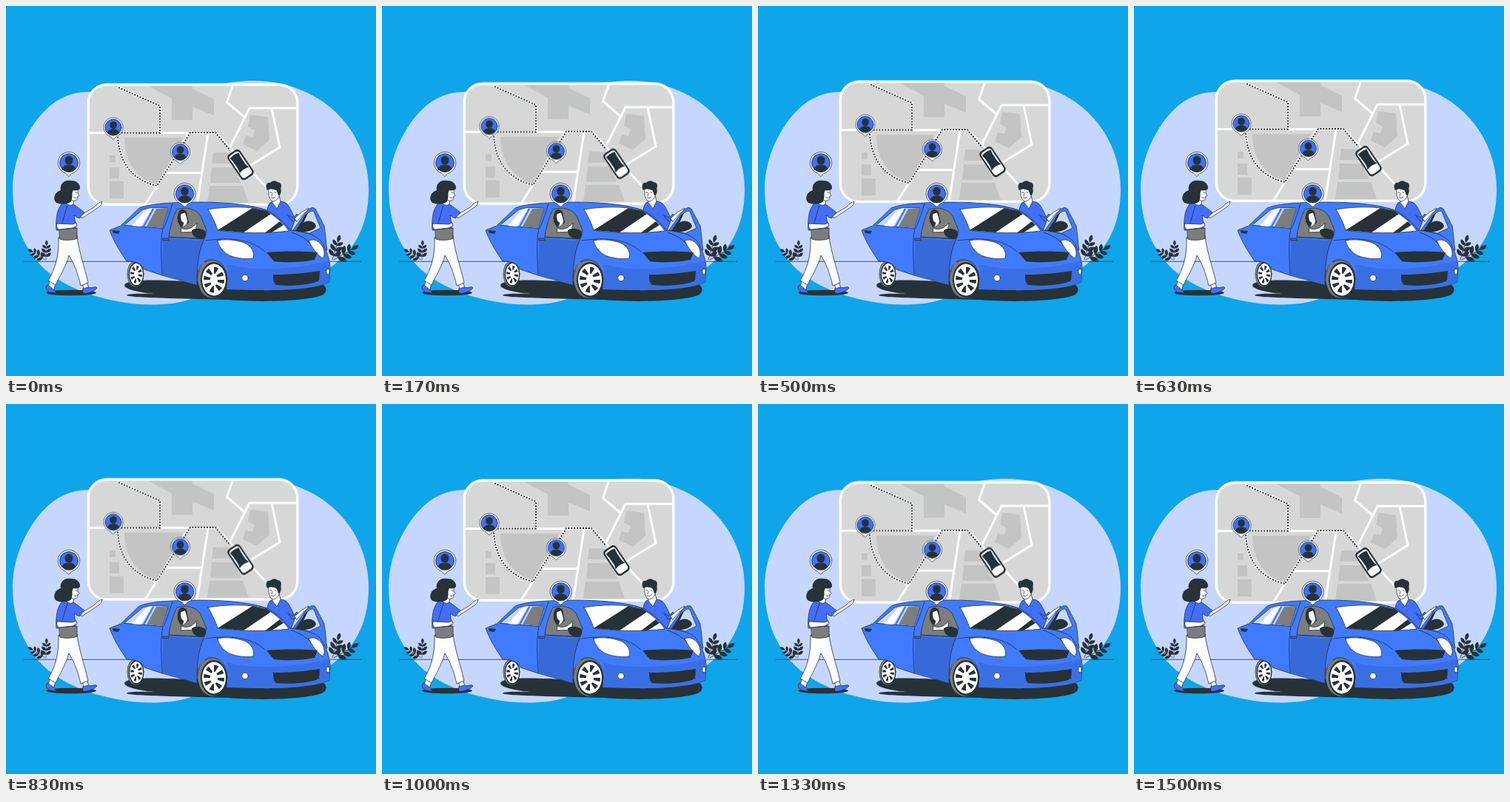
An HTML page for the animation above (1.54 s loop, 500 by 500 pixels).

```html
<!DOCTYPE html>
<html lang="en">
<head>
<meta charset="utf-8">
<title>Ride sharing</title>
<style>
  html, body { margin: 0; width: 100%; height: 100%; overflow: hidden; background: #0fa5ea; }
  svg { display: block; width: 100%; height: 100%; }
  .ink { fill: #263238; }
  .blue { fill: #416ff8; }
  .paint { fill: #407bff; }
  .shade { fill: #3869d8; }
  .white { fill: #fff; }
  .pale { fill: #c6d7ff; }
  .grey { fill: #7b7d7f; }
  .block { fill: #c3c4c4; }
  .edge { stroke: #263238; stroke-width: .8; stroke-linejoin: round; stroke-linecap: round; }
  .line { fill: none; }
  .road { fill: none; stroke: #fff; stroke-width: 3; }
  .dots { fill: none; stroke: #1b2226; stroke-width: 1.8; stroke-dasharray: 2 1.9; }
  #map { animation: float 1540ms linear infinite; }
  @keyframes float {
    0% { transform: translateY(0); }
    44.8% { transform: translateY(-5.5px); }
    93.5% { transform: translateY(.5px); }
    97.4%, 100% { transform: translateY(0); }
  }
</style>
</head>
<body>
<svg viewBox="0 0 500 500">
  <defs>
    <clipPath id="disc"><circle r="12.3"/></clipPath>
    <clipPath id="panel"><rect x="112" y="106.500" width="281" height="161.500" rx="24"/></clipPath>
    <g id="pin">
      <path class="white edge" d="M-5 14.100A15 15 0 1 1 5 14.100L0 18.500Z"/>
      <circle class="blue edge" r="12.800"/>
      <g clip-path="url(#disc)" class="ink">
        <ellipse cy="-3.600" rx="5.600" ry="6"/>
        <path d="M-10 13C-10 5 -6 2.500 0 2.500S10 5 10 13Z"/>
      </g>
    </g>
    <path id="leaf" class="ink" d="M0 0C0 -5 4 -8 9 -8C10 -4 6 1 0 0Z"/>
    <g id="pair">
      <use href="#leaf"/>
      <use href="#leaf" transform="scale(-1 1)"/>
    </g>
    <g id="sprig">
      <path class="line edge" d="M0 0V-30"/>
      <use href="#pair" y="-6"/>
      <use href="#pair" y="-14"/>
      <use href="#pair" transform="translate(0 -22) scale(.85)"/>
      <path class="ink" d="M0 -27C-4 -31 -3 -36 0 -38C3 -36 4 -31 0 -27Z"/>
    </g>
    <g id="wheel">
      <ellipse class="grey edge" rx="20" ry="26"/>
      <ellipse class="ink" cx="2" cy="1" rx="18" ry="24"/>
      <ellipse class="white" cx="2" cy="1" rx="16" ry="21.500"/>
      <ellipse cx="2" cy="1" rx="9.500" ry="13" fill="none" stroke="#263238" stroke-width="9" pathLength="64" stroke-dasharray="3.800 4.200"/>
      <ellipse class="white" cx="2" cy="1" rx="5" ry="6.500"/>
    </g>
  </defs>

  <path class="pale" d="M9 247C9 200 36 151 66 130C85 117 105 114 130 117C180 128 240 118 280 108C300 103 317 101 335 101C383 101 425 121 450 148C477 176 490 212 490 247C490 305 465 340 420 365C370 390 290 388 250 396C225 405 185 406 150 399C92 388 52 364 32 331C16 307 9 277 9 247Z"/>
  <path class="line edge" d="M24 345.300H480"/>
  <g>
    <use href="#sprig" transform="translate(54 343) rotate(2) scale(.7)"/>
    <use href="#sprig" transform="translate(53 343) rotate(-58) scale(.72)"/>
    <use href="#sprig" transform="translate(441 343) rotate(17) scale(.92)"/>
    <use href="#sprig" transform="translate(443 343) rotate(60) scale(1.020)"/>
  </g>

  <g id="map">
    <rect x="111.200" y="106.200" width="282.600" height="162.200" rx="25" fill="#d6d8d7"/>
    <g clip-path="url(#panel)">
      <g class="block">
        <path d="M190 107H252V112L281 126V148L252 136V154H224V125Z"/>
        <path d="M160 178H239L205 241C179 236 160 212 160 178Z"/>
        <path d="M140 202h8v9h-8zM140 218h13v15h-13zM140 237h19v23h-19z"/>
        <path d="M280 198H300L306 213H278ZM278 218H308L318 239H276ZM275 243H320L328 266H272Z"/>
        <path d="M330 147L354 150L356 181L339 196L320 187L324 175L333 177L336 168L327 163Z"/>
      </g>
      <g class="road">
        <path d="M111 171.500H284L360 254M273 172L258 270M214 225.500H264M204 243L187 270"/>
        <path d="M307 106L298.500 130L322 150M393 138H329L302 192M359 138L370 191L331 215"/>
        <path d="M151 109L208 135V171M151 171C151 212 172 236 204 243L248 171"/>
      </g>
      <path class="dots" d="M152 110L208 135V171.500H151C151 212 172 236 204 243L249 171H283L303 195"/>
    </g>
    <rect x="111.200" y="106.200" width="282.600" height="162.200" rx="25" fill="none" stroke="#fff" stroke-width="3.400"/>
    <use href="#pin" transform="translate(145 164) scale(.87)"/>
    <use href="#pin" transform="translate(235.500 197.500) scale(.87)"/>
    <g transform="translate(317 214.500) rotate(-34)">
      <rect class="ink" x="-10" y="-20.500" width="20" height="41" rx="5"/>
      <rect class="white" x="-8" y="-18" width="16" height="36" rx="4"/>
      <path class="ink" d="M-7 -15Q0 -17 7 -15L6 -8V3L7.500 9Q0 6 -7.500 9L-6 3V-8Z"/>
    </g>
  </g>

  <ellipse class="ink" cx="88" cy="387.500" rx="34" ry="3.800"/>
  <path class="ink" d="M160 377C165 369 200 370 240 372L420 373C437 377 437 390 420 393C390 400 330 400 300 397L220 395C190 394 165 393 163 391C165 388 190 389 200 389C180 387 160 383 160 377Z"/>

  <g id="rider">
    <path class="blue edge" d="M357 266C362 263 373 263 378 266C384 271 387 281 391 288L385 304L352 285C353 277 353 270 357 266Z"/>
    <path class="white edge" d="M359 262L360 266L366 274L371 264L369 256Z"/>
    <path class="white edge" d="M355 246C354 255 356 263 361 264C368 263 371 255 371 247Z"/>
    <path class="ink" d="M353 249C350 243 352 238 357 239C360 235 365 236 367 238C372 238 373 244 371 247C373 251 370 257 368 256L366 250C362 247 357 247 353 249Z"/>
    <path class="line edge" d="M357 252h2M363 252h2M360 253l-1 4M358 259Q361 261 364 258"/>
  </g>

  <g id="car">
    <path class="paint edge" d="M387 304L405 279C409 273 415 271 418 274L430 297C432 308 432 320 434 330L425 332Z"/>
    <path class="pale edge" d="M391 303L407 281C411 277 414 276 416 278L425 300L410 307Z"/>
    <path class="ink" d="M391 304L401 289C403 283 406 280 408 280L402 293C408 288 418 291 419 298C416 304 405 305 398 307Z"/>
    <use href="#wheel" transform="translate(175 362) scale(.56 .68)"/>
    <path class="paint edge" d="M180 273C192 268 212 266 240 265.500C275 264 325 266 353 276C367 284 377 294 384 303C402 305 416 308 424 316C431 324 437 340 438 352L437 373C424 381 380 385 340 384L298 383C300 357 292 343 276 343C263 344 257 358 258 377L211 364L187 356C184 349 175 345 163 345C153 330 145 317 140 303L155 297Z"/>
    <path class="shade" d="M212 313L258 317L268 316C259 333 258 354 258 377L211 364Z"/>
    <path d="M299 349C335 360 400 355 437 344L437 373C424 381 380 385 340 384L298 383C301 370 301 359 299 349Z" fill="#3a6fe4"/>

    <path class="pale edge" d="M160 296L185 275C195 272 208 272 219 273L211 300Z"/>
    <path class="white" d="M170 297L191 274L198 273L182 298Z"/>
    <path class="grey" d="M190 298L203 274L219 273L211 300Z"/>
    <path class="line" d="M186 298L199 274" stroke="#407bff" stroke-width="2.600"/>
    <path class="grey edge" d="M220 312C222 298 226 284 231 275C243 271 257 274 263 284L271 303L268 314Z"/>

    <path class="ink" d="M232 291C230 277 238 271 244 278L247 293L236 299Z"/>
    <path class="white edge" d="M236 281C235 288 237 292 240 293L238 300L244 295C247 291 244 284 242 279Z"/>
    <path class="white edge" d="M237 300C244 304 252 300 258 293L256 305L237 306Z"/>
    <path class="ink" d="M251 303C257 299 266 301 270 305C272 311 268 315 263 315C257 314 251 311 251 303Z"/>

    <path class="white edge" d="M273 275C302 270 335 271 352 277C365 285 377 295 382 304C357 307 320 308 286 303C283 293 278 283 273 275Z"/>
    <path class="ink" d="M333 273L352 277L358 281L321 306L286 303Z"/>
    <path class="ink" d="M370 291L375 296L359 306L350 306.500Z"/>

    <path class="line edge" d="M212 301C208 320 210 340 211 363M220 312L268 315C259 333 258 354 258 377M225 267C220 284 214 300 212 301M270 317C310 311 335 318 350 332M386 306C402 311 412 320 420 332"/>
    <path class="ink" d="M144 303L154 304L152 308L145 307Z"/>
    <path class="line edge" d="M212 314h8v2.500h-8z"/>

    <path class="white edge" d="M286 317C299 314 317 317 326 322C333 327 336 334 334 341C322 343 306 340 298 335C291 329 287 323 286 317Z"/>
    <path class="white edge" d="M409 317C417 314 423 318 427 324C431 331 431 337 428 341C420 336 414 327 409 317Z"/>
    <path class="ink" d="M352 333C372 331 403 331 421 333L417 343C397 347 376 347 362 345Z"/>
    <path class="ink" d="M361 363C382 363 405 361 424 358L423 371C413 377 385 379 365 377C361 374 361 368 361 363Z"/>
    <circle class="white edge" cx="323" cy="367.500" r="4.300"/>
    <ellipse class="white edge" cx="435" cy="359" rx="2.300" ry="3.800"/>
    <use href="#wheel" transform="translate(279 369)"/>
    <path class="blue edge" d="M381 283L387 291L397 286L393 281L388 286Z"/>
    <path class="white edge" d="M390 287L400 278L404 276L409 273L407 277L402 281L393 291Z"/>
  </g>
  <use href="#pin" transform="translate(241.500 253.800) scale(.96)"/>

  <g id="walker">
    <use href="#pin" transform="translate(85 212) scale(.98)"/>
    <path class="white edge" d="M59 372L56 382L64 385L67 375ZM103 375L106 385L112 383L110 374Z"/>
    <path class="blue edge" d="M56 377C52 380 55 386 60 387L69 388L63 382Z"/>
    <path class="blue edge" d="M104 382L111 380C116 382 121 378 123 381C119 386 111 389 104 388Z"/>
    <path class="white edge" d="M71 313L96 310C98 331 106 352 111 374L101 378C97 360 91 346 85 337C81 352 72 366 67 377L57 371C66 356 72 338 71 313Z"/>
    <path class="white edge" d="M97 285L119 272L124 267L130 264L129 268L125 272L104 286Z"/>
    <path class="blue edge" d="M76 267C69 274 67 287 68 303L94 301C94 293 93 288 92 283L99 287L106 279C98 273 91 267 86 265Z"/>
    <path class="white edge" d="M83 260L82 267C85 270 90 270 91 267L92 261Z"/>
    <path class="white edge" d="M88 244C95 243 98 247 97 253L99 256L97 258C97 262 94 264 90 263L84 258Z"/>
    <path class="ink" d="M100 247C101 241 95 235 88 236C79 234 72 241 74 249C66 251 63 260 67 265C73 269 84 268 88 264C91 258 88 253 91 249C94 250 98 249 100 247Z"/>
    <path class="line edge" d="M94 252l2 .500M92 259Q95 261 97 258M83 269L73 303"/>
    <path class="grey edge" d="M72 302L96 300L96 314C90 317 78 317 73 315Z"/>
    <path class="white edge" d="M69 294L90 295L95 293L96 297L90 300L72 302C69 301 68 298 69 294Z"/>
  </g>
</svg>
</body>
</html>
```
